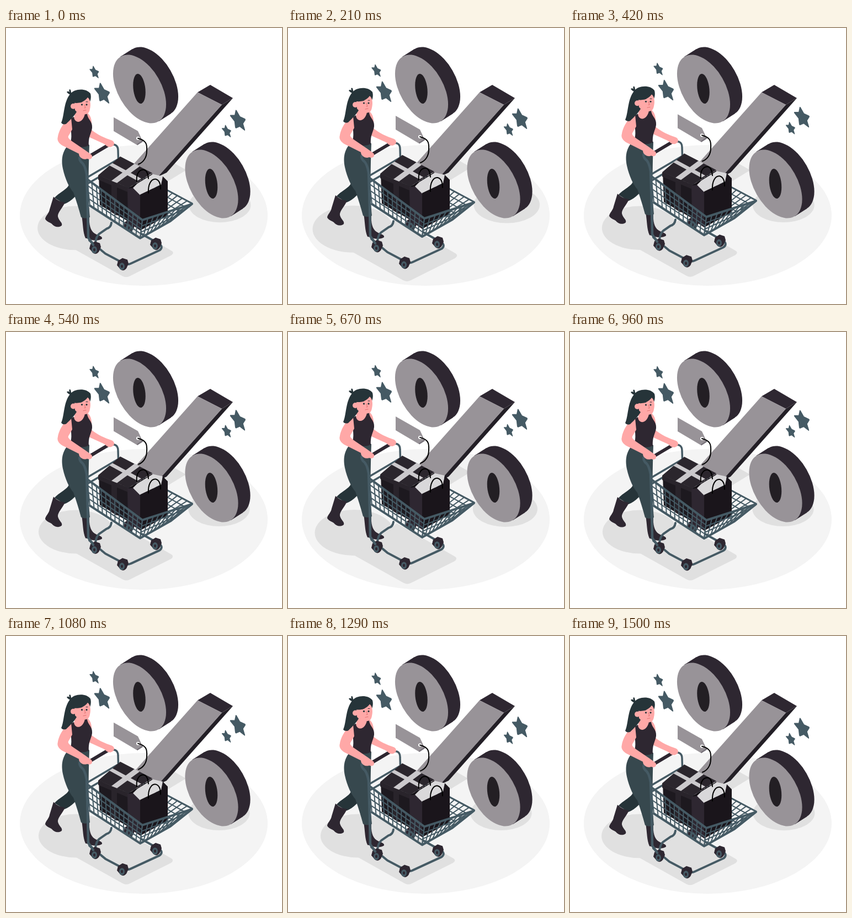
Animation of 500 by 500 pixels, one loop 1.54 s. Source, as an HTML page:

```html
<!DOCTYPE html>
<html lang="en">
<head>
<meta charset="utf-8">
<title>Shopping discount</title>
<style>
  html, body { margin: 0; width: 100%; height: 100%; overflow: hidden; background: #fff; }
  svg { display: block; width: 100%; height: 100%; }
  .pipe { fill: none; stroke: #455a64; stroke-linecap: round; stroke-linejoin: round; }
  .skin { fill: #ffa8a7; }
  .ink { fill: #2e2731; }
  .hair { fill: #263439; }
  .line { fill: none; stroke: #000; stroke-width: 2; stroke-linecap: round; }
</style>
</head>
<body>
<svg viewBox="0 0 500 500">
  <defs>
    <path id="star" transform="matrix(.866 .5 0 1 0 0)" fill="#455a64" stroke="#455a64" stroke-width="3" stroke-linejoin="round"
      d="M-4.500-15.500 2.900-8 13.500-9 8.500.3 12.500 10 2.300 8.200-5.500 15-7 4.800-16-.6-6.700-5.200Z"/>
    <g id="ring">
      <g fill="#2e2731">
        <circle r="55.500" transform="matrix(.866 .5 0 1 22 -14)"/>
        <path d="M-35-58.400-13-72.400 57 44.400 35 58.400Z"/>
      </g>
      <circle r="55.500" transform="matrix(.866 .5 0 1 0 0)" fill="#989398"/>
      <ellipse rx="13" ry="26.200" transform="matrix(.866 .5 0 1 -.5 -.5)" fill="#231f24"/>
    </g>
    <g id="caster">
      <path class="ink" d="M-8-7 0-12 9-9 11-2 7 7-4 8-10 1Z"/>
      <ellipse cx="1" cy="2" rx="7" ry="8.500" fill="#2e2731"/>
      <ellipse cx="-1" cy="3" rx="5" ry="6.500" fill="#455a64"/>
      <ellipse cx="-1" cy="3" rx="2" ry="2.800" fill="#2e2731"/>
    </g>
  </defs>

  <ellipse cx="249.500" cy="339.500" rx="224.500" ry="127.500" fill="#f4f4f4"/>
  <g id="shadow" fill="#e0e0e0">
    <ellipse cx="127" cy="362" rx="68" ry="39.500"/>
    <path d="M127 401 211 448Q218 452 225 448L299 411Q306 406 298 402L200 346Z"/>
    <ellipse cx="386" cy="321" rx="55.500" ry="31"/>
    <path d="M235 290 303 245 326 258 272 291Z"/>
  </g>

  <use href="#ring" x="242" y="110.500"/>
  <path fill="#231f26" d="M391 139 411 127 291 262 274 270Z"/>
  <path fill="#2e2731" d="M347 116.500 370 103 411 127 391 139Z"/>
  <path fill="#989398" d="M347 116.500 391 139 275 270 230 248Z"/>
  <use href="#ring" x="372.500" y="282.500"/>

  <g id="floating">
    <use href="#star" transform="translate(175 119)"/>
    <use href="#star" transform="translate(160.500 80.500) scale(.6)"/>
    <use href="#star" transform="translate(421 168)"/>
    <use href="#star" transform="translate(400 187.500) scale(.6)"/>

    <!-- price tag -->
    <path fill="#989398" d="M195 162 239 187 248 206 238 212.500 195 187Z"/>
    <path fill="#77727a" d="M238 212.500 248 206 247 204 237 210.500Z"/>
    <circle cx="239" cy="200" r="3" fill="#fff"/>
    <path class="line" d="M239 200C253 204 256 209 255 223C255 236 248 244 240 247"/>

    <!-- legs -->
    <path class="hair" d="M110 262C116 275 117 284 110 290C102 297 92 302 88 308L106 319C118 315 131 301 142 284Z"/>
    <path class="ink" d="M86 306Q95 315 107 316C102 327 93 335 94 342C96 350 103 353 101 358C95 363 87 360 83 355C79 352 73 351 71 346C72 340 78 336 79 329Z"/>
    <path class="ink" d="M137 340 151 340C150 357 153 367 160 372C168 377 175 377 174 382C169 386 156 386 150 382L144 381C139 370 140 357 137 340Z"/>
    <path fill="#37484e" d="M118 207C103 220 99 235 103 255C107 274 115 290 122 298C128 315 132 328 136 343Q144 347 152 343C149 310 149 270 151 212Z"/>

    <!-- rear of the cart -->
    <g class="pipe" stroke-width="3.500">
      <path d="M184 213Q203 207 203 222L204 258M147 271 203 238M150 281 198 253"/>
      <path d="M204 247 337 318" stroke-width="3"/>
      <path id="farPanel" stroke-width="2"/>
      <path d="M191 353Q190 362 182 364L169 373Q163 378 162 390M151 385 180 409 214 427Q220 430 226 427L278 403Q285 398 279 392L245 373" stroke-width="4"/>
    </g>
    <use href="#caster" x="223" y="359"/>
    <use href="#caster" x="161" y="399"/>
    <use href="#caster" x="211" y="429"/>
    <use href="#caster" x="271" y="392"/>

    <!-- gift box -->
    <path fill="#1d191f" d="M168 267 222 290 222 351 170 321Z"/>
    <path fill="#151116" d="M222 290 265 264 265 330 222 351Z"/>
    <path fill="#2b262d" d="M207 233 265 263 222 290 167 267Z"/>
    <path fill="#29242b" d="M167 267 222 290 222 298 167 275Z"/>
    <path fill="#29242b" d="M191 277 201 281 201 340 191 334Z"/>
    <path fill="#cbc9cc" d="M187 249 193 245 245 273 238 277ZM233 246 242 251 201 281 191 277Z"/>

    <!-- shopping bag -->
    <path fill="#2e2731" d="M220 291 231 290 243 302 243 367 221 352Z"/>
    <path fill="#d9d8da" d="M230 290 238 282 266 265 284 269 282 283 243 303Z"/>
    <path class="line" d="M237 278C235 263 243 256 250 257Q257 259 258 273"/>
    <path fill="#1a151b" d="M243 302 281 284 284 269 293 278 293 340 243 367Z"/>
    <path class="line" d="M258 299C257 284 263 273 271 274Q280 276 280 292"/>

    <!-- front of the cart -->
    <g class="pipe" stroke-width="2">
      <path id="nearPanel"/>
      <path id="frontPanel"/>
      <path stroke-width="4" d="M147 274 247 348 337 319 298 350 243 381 152 322"/>
      <path stroke-width="4.500" d="M152 234 140 230Q129 233 136 243Q143 247 146 265L148 330 149 380 158 393"/>
      <path stroke="#2e2731" stroke-width="6" d="M152 232 184 213"/>
    </g>

    <!-- upper body -->
    <path class="skin" d="M147 154C154 158 157 170 154 184C164 193 180 200 192 204C199 208 196 215 189 216C181 216 182 211 173 208L151 198Z"/>
    <path class="skin" d="M124 146 142 150 146 157 149 182 118 182 116 165 124 161Z"/>
    <path class="ink" d="M118 164 123 161C124 174 139 174 143 156L147 154C147 166 157 168 156 181C155 191 149 196 150 213C138 219 122 215 117 207C121 193 115 182 118 164Z"/>
    <path class="skin" d="M118 163C106 167 96 185 94 197C91 206 99 212 106 215L132 228C132 235 141 240 147 237C154 240 158 235 155 230L144 222 119 205Q111 199 113 196L120 184Z"/>

    <!-- head -->
    <path class="hair" d="M116 120C124 109 146 109 153 119C155 126 153 134 150 137L130 148C126 158 116 167 109 174Q103 176 100 172C106 159 104 135 116 120Z"/>
    <path class="hair" d="M110 116Q112 114 115 116Q113 110 117 112L119 121Q113 121 110 116Z"/>
    <path class="skin" d="M124 136C134 137 143 133 148 126C153 130 154 139 152 147C151 154 147 158 141 156Q130 156 125 149Z"/>
    <circle class="skin" cx="122" cy="142" r="5"/>
    <g class="hair"><circle cx="137.500" cy="139" r="1.600"/><circle cx="146" cy="139" r="1.600"/></g>
    <path d="M134 135 138 134M145 134 148 134" class="line" style="stroke:#263439;stroke-width:1"/>
    <path d="M142 139 144 145 142 145M140 150Q143 149 145 149" class="line" style="stroke:#e0706f;stroke-width:1"/>
  </g>
</svg>
<script>
  const $ = id => document.getElementById(id);
  const mix = (a, b, k) => [a[0] + (b[0] - a[0]) * k, a[1] + (b[1] - a[1]) * k];

  // Wire mesh across the quad a-b (top) and d-c (bottom).
  function mesh(id, a, b, c, d, columns, rows) {
    let path = '';
    const line = (p, q) => path += `M${p}L${q}`;
    for (let i = 0; i <= columns; i++) line(mix(a, b, i / columns), mix(d, c, i / columns));
    for (let j = 0; j <= rows; j++) line(mix(a, d, j / rows), mix(b, c, j / rows));
    $(id).setAttribute('d', path);
  }
  mesh('farPanel', [204, 247], [337, 318], [290, 345], [204, 290], 15, 4);
  mesh('nearPanel', [147, 274], [247, 348], [243, 381], [152, 322], 12, 4);
  mesh('frontPanel', [247, 348], [337, 319], [298, 350], [243, 381], 9, 3);

  const LOOP = 1540, FRAMES = 37, FPS = 24, PERIOD = 1500, START = 15;
  const beats = [[0, 1], [.1, 1.1], [.3, 1], [.4, 1], [.5, 1.1], [.6, 1], [1, 1]];

  function heartbeat(p) {
    const i = beats.findIndex(b => b[0] > p);
    const [p0, s0] = beats[i - 1], [p1, s1] = beats[i];
    return s0 + (s1 - s0) * (p - p0) / (p1 - p0);
  }

  function draw(now) {
    // Steps start on the nearest 10 ms, hence the 5 ms of slack.
    const frame = Math.floor((now + 5) % LOOP / LOOP * FRAMES);
    const p = (frame * 1000 / FPS + START) % PERIOD / PERIOD;
    const rise = 10 * (1 - Math.abs(1 - 2 * p));
    $('floating').setAttribute('transform', `translate(0 ${-rise})`);
    $('shadow').setAttribute('transform', `translate(250 332) scale(${heartbeat(p)}) translate(-250 -332)`);
    requestAnimationFrame(draw);
  }
  draw(0);
</script>
</body>
</html>
```
